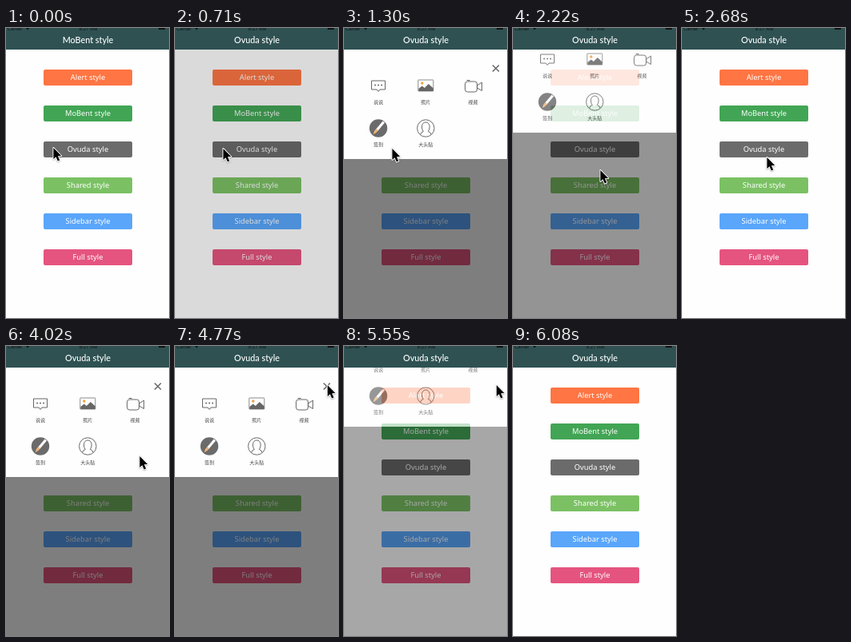
An HTML page with a canvas for the animation above (7.5 s loop, 204 by 363 pixels).

```html
<!DOCTYPE html>
<html lang="en">
<head>
<meta charset="utf-8">
<title>Menu styles</title>
<style>
html, body { margin: 0; width: 100%; height: 100%; overflow: hidden; background: #fefefe; }
canvas { display: block; width: 204px; height: 363px; }
</style>
</head>
<body>
<canvas id="stage"></canvas>
<script>
const W = 204, H = 363, NAV = 27, LOOP = 7500, STEP = 57.4;
const SHEET_BOTTOM = 164, TRAVEL = 205, SLIDE = 250;
const TITLE_CHANGE = 650, POINTER_GONE = 6080;
const PAPER = '#fefefe', GREY = '#666', INK = '#111';
const scale = window.devicePixelRatio || 1;

const buttons = [
  ['Alert style', '#ff7543'],
  ['MoBent style', '#42a555'],
  ['Ovuda style', '#6b6b6b'],
  ['Shared style', '#7bc164'],
  ['Sidebar style', '#5aa6fb'],
  ['Full style', '#e5547f']
];

// lead: how far the slide has run when it first shows
const slides = [
  { at: 650, lead: 30, opens: true },
  { at: 2220, lead: 64, opens: false },
  { at: 3620, lead: 30, opens: true },
  { at: 5550, lead: 92, opens: false }
];

const moves = [
  { from: 0, to: 60, x: 60, y: 150 },
  { from: 1300, to: 1800, x: 109, y: 177 },
  { from: 2440, to: 2680, x: 106, y: 161 },
  { from: 3040, to: 3380, x: 134, y: 148 },
  { from: 3700, to: 4020, x: 167, y: 137 },
  { from: 4020, to: 4310, x: 190, y: 50 },
  { from: 4480, to: 4770, x: 190.5, y: 48 }
];

const clamp = v => Math.max(0, Math.min(1, v));
const ease = v => v * v * (3 - 2 * v);
const mix = (a, b, p) => a + (b - a) * p;
// Elapsed time, held between screen updates
const held = ms => Math.floor(ms / STEP + 0.1) * STEP;

function openness(t) {
  const s = slides.filter(s => s.at <= t).pop();
  if (!s) return 0;
  const p = ease(clamp((s.lead + held(t - s.at)) / SLIDE));
  return s.opens ? p : 1 - p;
}

function pointerAt(t) {
  let x = 59, y = 149;
  for (const m of moves) {
    if (t < m.from) break;
    const p = t >= m.to ? 1 : clamp(held(t - m.from) / (m.to - m.from));
    x = mix(x, m.x, p);
    y = mix(y, m.y, p);
  }
  return [x, y];
}

function setup(canvas) {
  canvas.width = Math.round(W * scale);
  canvas.height = Math.round(H * scale);
  const g = canvas.getContext('2d');
  g.scale(scale, scale);
  return g;
}

function text(g, str, x, y, font, color, align = 'center') {
  g.font = font;
  g.fillStyle = color;
  g.textAlign = align;
  g.fillText(str, x, y);
}

function box(g, x, y, w, h, r) {
  g.beginPath();
  g.roundRect(x, y, w, h, r);
}

function disc(g, x, y, r) {
  g.beginPath();
  g.arc(x, y, r, 0, Math.PI * 2);
}

function poly(g, pts) {
  g.beginPath();
  pts.forEach(([x, y]) => g.lineTo(x, y));
  g.closePath();
}

function fill(g, color) {
  g.fillStyle = color;
  g.fill();
}

// Icons are drawn around their own centre
function bubbleIcon(g) {
  poly(g, [[-8.5, -6.5], [8.5, -6.5], [8.5, 4.5], [2, 4.5], [0, 7], [-2, 4.5], [-8.5, 4.5]]);
  g.stroke();
  for (const x of [-4, 0, 4]) {
    disc(g, x, -1, 1);
    fill(g, GREY);
  }
}

function photoIcon(g) {
  box(g, -9.5, -7.5, 19, 14, 0.5);
  g.strokeStyle = '#8a8a8a';
  g.stroke();
  disc(g, -4.5, -3.5, 1.7);
  fill(g, '#f0a040');
  poly(g, [[-9, 6.5], [-9, 3.5], [-4.5, 0], [-1.5, 2.5], [3.5, -2.5], [9.5, 3], [9.5, 6.5]]);
  fill(g, GREY);
}

function videoIcon(g) {
  box(g, -10, -5.5, 15, 13, 3);
  g.stroke();
  poly(g, [[5, -0.5], [11, -4.5], [11, 6], [5, 2.5]]);
  g.stroke();
  box(g, -8, -7.5, 4, 1, 0);
  fill(g, GREY);
}

function pencilIcon(g) {
  disc(g, 0, 0, 11.2);
  fill(g, '#6b6b6b');
  g.rotate(0.7);
  box(g, -1.6, -10.5, 3.2, 14, 0);
  fill(g, '#fff');
  poly(g, [[-1.6, 2], [1.6, 2], [1.6, 6], [0, 10], [-1.6, 6]]);
  fill(g, '#efb57c');
}

function bustIcon(g) {
  disc(g, 0, 0, 10.7);
  g.stroke();
  g.beginPath();
  g.moveTo(-6.5, 7.5);
  g.quadraticCurveTo(-6, 4.5, -3, 4);
  g.bezierCurveTo(-6, 0, -5.5, -7.5, 0, -7.5);
  g.bezierCurveTo(5.5, -7.5, 6, 0, 3, 4);
  g.quadraticCurveTo(6, 4.5, 6.5, 7.5);
  g.stroke();
}

function makeSheet() {
  const canvas = document.createElement('canvas');
  const g = setup(canvas);
  g.fillStyle = PAPER;
  g.fillRect(0, 0, W, SHEET_BOTTOM);

  const items = [
    [bubbleIcon, '说说'], [photoIcon, '照片'], [videoIcon, '视频'],
    [pencilIcon, '签到'], [bustIcon, '大头贴']
  ];
  items.forEach(([draw, label], i) => {
    const x = 43 + 59.3 * (i % 3), y = 72.5 + 53 * Math.floor(i / 3);
    g.save();
    g.translate(x, y);
    g.strokeStyle = GREY;
    g.lineJoin = 'round';
    draw(g);
    g.restore();
    text(g, label, x, y + 22.5, '6px "Noto Sans CJK SC", "Noto Sans CJK", sans-serif', '#444');
  });

  g.strokeStyle = GREY;
  g.lineWidth = 1.5;
  g.beginPath();
  for (const d of [-4, 4]) {
    g.moveTo(190 - d, 46.5);
    g.lineTo(190 + d, 54.5);
  }
  g.stroke();
  return canvas;
}

const ctx = setup(document.getElementById('stage'));
const sheet = makeSheet();

function drawButtons() {
  buttons.forEach(([label, color], i) => {
    const y = 52 + i * 45;
    box(ctx, 47, y, 111, 20, 2);
    fill(ctx, color);
    text(ctx, label, 102.5, y + 13, '9.3px "Noto Sans", "Open Sans", sans-serif', '#fff');
  });
}

function drawSheet(open) {
  if (open <= 0) return;
  const shift = Math.round(TRAVEL * (1 - open));
  const top = Math.max(NAV, SHEET_BOTTOM - shift);
  ctx.fillStyle = `rgba(0,0,0,${0.5 * open})`;
  ctx.fillRect(0, top, W, H - top);
  ctx.globalAlpha = open;
  ctx.drawImage(sheet, 0, -shift, W, H);
  ctx.globalAlpha = 1;
}

function drawNav(title) {
  ctx.fillStyle = '#2f5152';
  ctx.fillRect(0, 0, W, NAV);
  const font = '6px "Liberation Sans", Arial, sans-serif';
  text(ctx, 'Carrier', 2, 2.5, font, INK, 'left');
  text(ctx, '8:27 AM', 103, 2.5, font, INK);
  poly(ctx, [[25, 0], [29, 0], [27, 2.5]]);
  fill(ctx, INK);
  box(ctx, 191, 0, 8, 2, 0);
  fill(ctx, INK);
  text(ctx, title, 102.5, 19, '500 10.8px Lato, sans-serif', '#fff');
}

function drawPointer(x, y) {
  ctx.save();
  ctx.translate(x + 0.4, y + 1);
  poly(ctx, [[0, 0], [0, 14], [3.1, 11.2], [5.4, 16.6], [7.8, 15.6], [5.5, 10.3], [9.8, 10.1]]);
  ctx.lineJoin = 'round';
  ctx.lineWidth = 2;
  ctx.strokeStyle = '#fff';
  ctx.shadowColor = 'rgba(0,0,0,0.4)';
  ctx.shadowBlur = 1.5 * scale;
  ctx.shadowOffsetY = 0.5 * scale;
  ctx.stroke();
  ctx.shadowColor = 'transparent';
  fill(ctx, '#000');
  ctx.restore();
}

function frame() {
  const t = performance.now() % LOOP;
  ctx.fillStyle = PAPER;
  ctx.fillRect(0, 0, W, H);
  drawButtons();
  drawSheet(openness(t));
  drawNav(buttons[t < TITLE_CHANGE ? 1 : 2][0]);
  if (t < POINTER_GONE) drawPointer(...pointerAt(t));
  requestAnimationFrame(frame);
}
frame();
</script>
</body>
</html>
```
